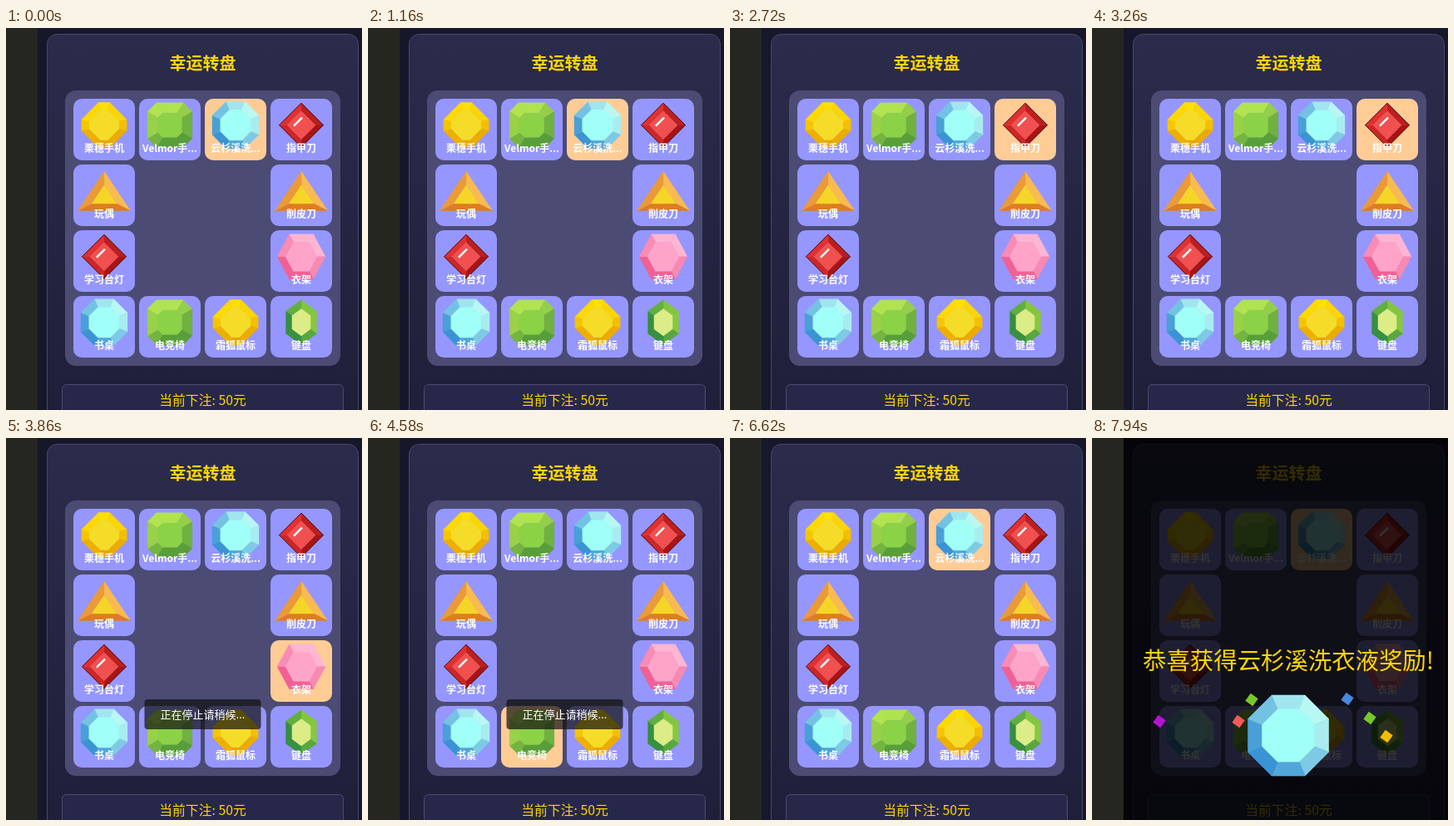
These frames come from a looping animation (428x459 px, 8 s). An HTML page with a canvas:

```html
<!DOCTYPE html>
<html lang="zh">
<head>
<meta charset="utf-8">
<title>幸运转盘</title>
<style>
html, body { margin: 0; width: 100%; height: 100%; overflow: hidden; background: #17172b; }
canvas { display: block; width: 428px; height: 459px; }
</style>
</head>
<body>
<canvas id="stage" width="428" height="459"></canvas>
<script>
const ctx = document.getElementById('stage').getContext('2d');
const FONT = '"Noto Sans CJK SC", "Noto Sans CJK", "Open Sans", sans-serif';
const LOOP = 8000, TICK = 60, SPIN = 500, BRAKE = 5420, WIN = 7580;
const MID = 236.5, GOLD = '#ffd700';

function trace(points) {
  ctx.beginPath();
  points.forEach(([x, y]) => ctx.lineTo(x, y));
  ctx.closePath();
}

function poly(points, fill) {
  trace(points);
  ctx.fillStyle = ctx.strokeStyle = fill;
  ctx.lineWidth = 0.4;
  ctx.fill();
  ctx.stroke();
}

function box(x, y, w, h, r, fill, stroke) {
  ctx.beginPath();
  ctx.roundRect(x, y, w, h, r);
  ctx.fillStyle = fill;
  ctx.fill();
  if (!stroke) return;
  ctx.strokeStyle = stroke;
  ctx.lineWidth = 1;
  ctx.stroke();
}

function text(str, x, y, size, color, weight = 400) {
  ctx.font = `${weight} ${size}px ${FONT}`;
  ctx.textAlign = 'center';
  ctx.fillStyle = color;
  ctx.fillText(str, x, y + size * 0.36);
}

function mix(from, to, k) {
  const rgb = hex => [1, 3, 5].map(i => parseInt(hex.slice(i, i + 2), 16));
  const end = rgb(to);
  return `rgb(${rgb(from).map((v, i) => Math.round(v + (end[i] - v) * k))})`;
}

const scaled = (points, kx, ky = kx) => points.map(([x, y]) => [x * kx, y * ky]);

// Regular polygon; the first corner sits at `turn` degrees.
const ring = (n, r, turn) => Array.from({ length: n }, (_, i) => {
  const a = (turn / 360 + i / n) * 2 * Math.PI;
  return [r * Math.cos(a), r * Math.sin(a)];
});

// Cut every corner off at the share c of its edges.
const chamfer = (points, c) => points.flatMap((p, i) => {
  const n = points.length;
  return [points[(i + n - 1) % n], points[(i + 1) % n]]
    .map(q => [p[0] + (q[0] - p[0]) * c, p[1] + (q[1] - p[1]) * c]);
});

// Facets are shaded from dark to light by how far they face the light angle.
const gems = {
  yellow: { shape: chamfer(ring(4, 34, -90), 0.2), core: 0.66, colors: ['#eaa400', '#ffe000', '#f5dc28'], light: -95 },
  green: { shape: chamfer(ring(4, 38, -135), 0.2), core: 0.54, colors: ['#559c38', '#b4e650', '#8cd246'], light: -115 },
  cyan: { shape: ring(8, 30.3, -112.5), core: 0.65, colors: ['#3a94d4', '#b8f8f4', '#a0fff6'], light: -40 },
  red: { shape: ring(4, 26.5, -90), core: 0.64, colors: ['#a81414', '#e23030', '#f05050'], light: -150, glint: true },
  orange: { shape: scaled(ring(3, 36.5, -90), 1, 0.86), drop: 8, core: 0.47, colors: ['#dc7820', '#fcc054', '#f5d628'], light: -60 },
  pink: { shape: scaled(ring(6, 29, -120), 1, 1.07), core: 0.65, colors: ['#f05a90', '#ffbcd6', '#ffa4c8'], light: -60 },
  leaf: { shape: scaled(ring(6, 27, -90), 0.79, 1), core: 0.6, colors: ['#2e8b40', '#8ccc3e', '#dcec86'], light: -30 }
};

function drawGem(name, x, y, size = 1) {
  const { shape, drop = 0, core, colors: [dark, light, heart], light: angle, glint } = gems[name];
  const inner = scaled(shape, core);
  ctx.save();
  ctx.translate(x, y + drop);
  ctx.scale(size, size);
  shape.forEach((p, i) => {
    const j = (i + 1) % shape.length, q = shape[j];
    const facing = Math.atan2(p[1] + q[1], p[0] + q[0]) - angle * Math.PI / 180;
    poly([p, q, inner[j], inner[i]], mix(dark, light, 0.5 + 0.5 * Math.cos(facing)));
  });
  poly(inner, heart);
  if (glint) {
    trace(shape);
    ctx.strokeStyle = '#401018';
    ctx.lineWidth = 1;
    ctx.stroke();
    trace([[-9, 1], [1, -9]]);
    ctx.strokeStyle = '#fff';
    ctx.lineWidth = 2.5;
    ctx.stroke();
  }
  ctx.restore();
}

const prizes = [
  ['栗穗手机', 'yellow'], ['Velmor手...', 'green'], ['云杉溪洗...', 'cyan'], ['指甲刀', 'red'],
  ['削皮刀', 'orange'], ['衣架', 'pink'], ['键盘', 'leaf'], ['霜狐鼠标', 'yellow'],
  ['电竞椅', 'green'], ['书桌', 'cyan'], ['学习台灯', 'red'], ['玩偶', 'orange']
];

// Clockwise walk around the rim of a 4 x 4 grid.
function cellAt(i) {
  const k = i % 3;
  const [col, row] = [[k, 0], [3, k], [3 - k, 3], [0, 3 - k]][Math.floor(i / 3)];
  return [81 + 79 * col, 85 + 79 * row];
}

// A fast run that slows gently, then two last late steps.
function activeCell(t) {
  if (t < SPIN) return 2;
  if (t >= BRAKE) return (t >= BRAKE + 240) + (t >= BRAKE + 1200);
  const s = (t - SPIN) / 1000;
  return Math.floor(10.46 + 24.34 * s - 0.0814 * s ** 3) % 12;
}

function drawBoard(active) {
  ctx.fillStyle = '#17172b';
  ctx.fillRect(0, 0, 428, 459);
  ctx.fillStyle = '#262620';
  ctx.fillRect(0, 0, 38, 459);

  const card = ctx.createLinearGradient(0, 7, 0, 459);
  card.addColorStop(0, '#2b2b4c');
  card.addColorStop(1, '#1f1f3a');
  box(49.5, 7.5, 374, 480, 12, card, '#47476a');
  text('幸运转盘', MID, 43, 20, GOLD, 700);
  box(71, 75, 331, 331, 13, '#4b4b74');
  box(67.5, 428.5, 338, 60, 5, '#27274a', '#4b4b70');
  text('当前下注: 50元', MID, 447.3, 15.8, GOLD);

  prizes.forEach(([label, gem], i) => {
    const [x, y] = cellAt(i);
    box(x, y, 74, 74, 10, i === active ? '#ffcc96' : '#9696ff');
    drawGem(gem, x + 37, y + 31.7);
    text(label, x + 37, y + 60, 12, '#fff', 700);
  });
}

function drawToast(t) {
  const alpha = Math.min((t - 3380) / 180, (4880 - t) / 180, 1);
  if (alpha <= 0) return;
  ctx.globalAlpha = alpha;
  box(166.5, 314, 140, 36, 4, 'rgba(17,17,17,0.7)');
  text('正在停止请稍候...', MID, 332.4, 13, '#fff');
  ctx.globalAlpha = 1;
}

const confetti = [
  [-44, -43, '#78c828'], [71, -44, '#4688dc'], [-155, -17, '#b414d2'],
  [-60, -17, '#f05a5a'], [98, -21, '#78c828'], [118, 1, '#f0be00']
];

function drawWin(t) {
  if (t < WIN) return;
  const p = Math.min(1, (t - WIN + TICK) / 420);
  const ease = 1 - (1 - p) ** 3;
  ctx.save();
  ctx.fillStyle = `rgba(0,0,0,${0.8 * ease})`;
  ctx.fillRect(38, 0, 390, 459);
  ctx.globalAlpha = ease;
  ctx.translate(236, 357.5);
  ctx.save();
  ctx.scale(0.5 + 0.5 * ease, 0.5 + 0.5 * ease);
  text('恭喜获得云杉溪洗衣液奖励!', 0, -90, 28.4, GOLD, 500);
  drawGem('cyan', 0, 0, 1.73);
  ctx.restore();
  confetti.forEach(([x, y, color]) => {
    ctx.save();
    ctx.translate(x * p, y * p);
    ctx.rotate(p * 0.62);
    ctx.fillStyle = color;
    ctx.fillRect(-5.5, -5.5, 11, 11);
    ctx.restore();
  });
  ctx.restore();
}

const start = performance.now();

function frame() {
  const time = (performance.now() - start) % LOOP;
  const t = time < SPIN ? 0 : time - (time - SPIN) % TICK;
  drawBoard(activeCell(t));
  drawToast(t);
  drawWin(t);
  requestAnimationFrame(frame);
}

frame();
</script>
</body>
</html>
```
